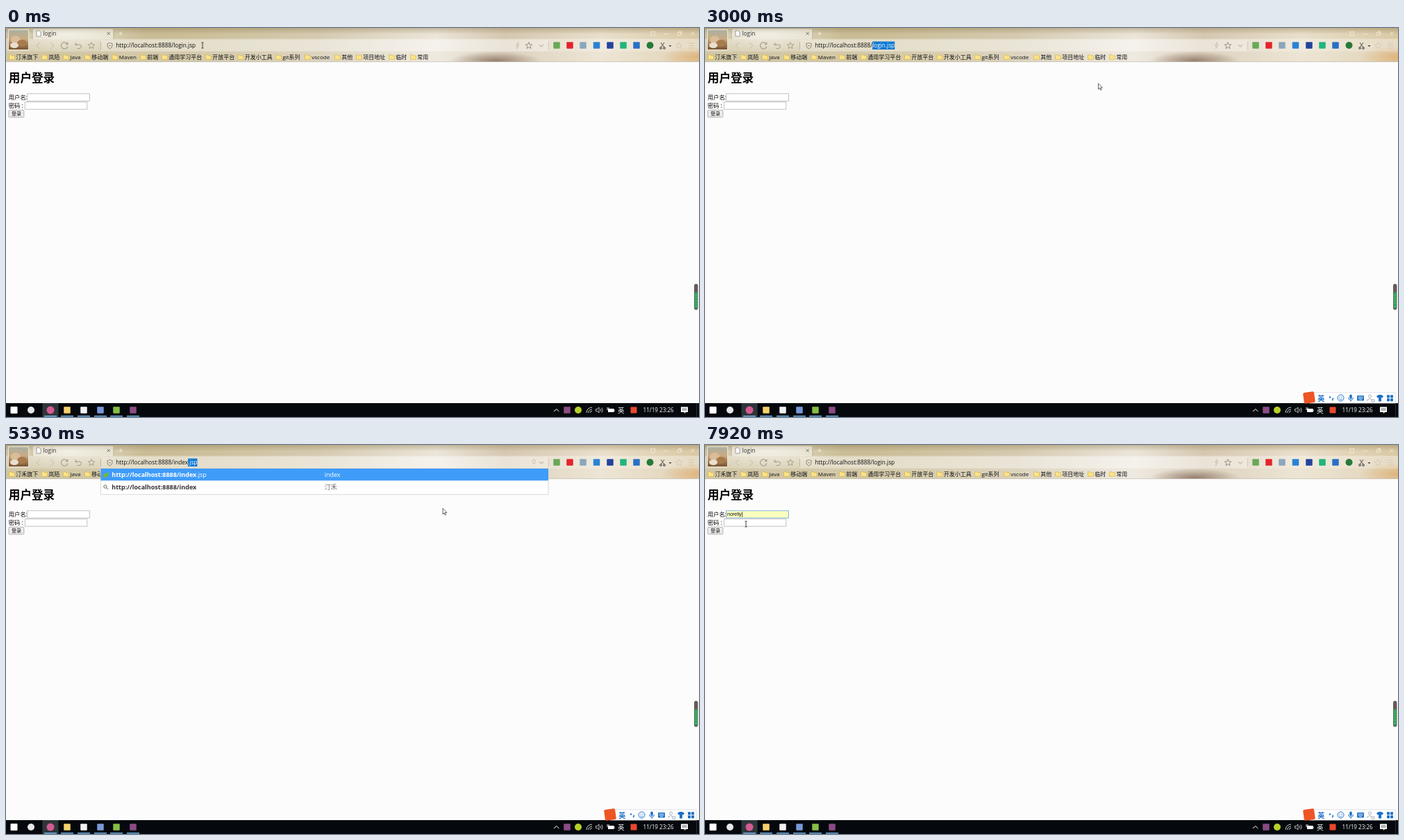
An HTML page that plays this animation: 998 px wide and 561 px high, repeating every 8000 ms.

```html
<!DOCTYPE html>
<html lang="zh-CN">
<head>
<meta charset="utf-8">
<title>login</title>
<style>
html, body { margin: 0; width: 100%; height: 100%; overflow: hidden; background: #fcfcfd; }
#skin {
  position: absolute; width: 998px; height: 49px;
  background:
    linear-gradient(#8b784866, #fff0 9px 15px, #ffffff59 16px 33px, #ffffff30 35px),
    radial-gradient(ellipse 65px 13px at 705px 47px, #72543fdd, #72543f00),
    radial-gradient(ellipse 55px 16px at 998px 42px, #d8994ccc, #d8994c00),
    radial-gradient(ellipse 110px 28px at 90px 8px, #fff9, #fff0),
    linear-gradient(90deg, #c6b990, #cabd96 25%, #d5cab0 45%, #ebe5d9 62%, #d5c7b0 72%, #e9dfcb 86%, #d9c8a4);
}
svg { position: absolute; left: 0; top: 0; white-space: pre; }
</style>
</head>
<body>
<div id="skin"></div>
<svg id="stage" width="998" height="561" font-family="'Open Sans','Noto Sans CJK SC','Noto Sans CJK',sans-serif"></svg>
<script>
const rect = (x, y, w, h, fill, more = '') =>
  `<rect x="${x}" y="${y}" width="${w}" height="${h}" fill="${fill}" ${more}/>`;
const circle = (x, y, r, fill, more = '') =>
  `<circle cx="${x}" cy="${y}" r="${r}" fill="${fill}" ${more}/>`;
const line = (d, color, width = 1, fill = 'none') =>
  `<path d="${d}" stroke="${color}" stroke-width="${width}" fill="${fill}"/>`;
const text = (x, y, str, size = 8.3, fill = '#111', more = '') =>
  `<text x="${x}" y="${y}" font-size="${size}" fill="${fill}" ${more}>${str}</text>`;
const group = (id, body) => `<g id="${id}">${body}</g>`;
const square = (x, y, s, fill) => rect(x - s / 2, y - s / 2, s, s, fill, 'rx="1"');
const star = (x, y, color) => {
  let d = '';
  for (let i = 0; i < 10; i++) {
    const r = i % 2 ? 2.2 : 5, a = i * Math.PI / 5;
    d += `${i ? 'L' : 'M'}${x + r * Math.sin(a)} ${y - r * Math.cos(a)}`;
  }
  return line(d + 'Z', color, .9);
};
const folder = x =>
  line(`M${x + .5} 38.7h3l1 1.2h4v5.3h-8z`, '#d9b440', .7, '#fbe48a');

function photo() {
  return `<defs><linearGradient id="fur" x2="0" y2="1"><stop stop-color="#aab0a4"/>
    <stop offset=".45" stop-color="#c9ab84"/><stop offset="1" stop-color="#76502f"/></linearGradient></defs>`
    + rect(3.5, 2.5, 29, 29, 'url(#fur)', 'stroke="#eee8da"')
    + '<ellipse cx="14" cy="17" rx="7" ry="6" fill="#d8bd98"/><ellipse cx="23" cy="22" rx="7" ry="5" fill="#a87b4c"/>'
    + '<ellipse cx="12" cy="25" rx="6" ry="4" fill="#eadfce"/>';
}

function browser() {
  const pale = '#cfc6b4', gray = '#a1998a';
  let s = line('M38 16V3q0-2 2-2H153q2 0 2 2V16', '#a99c80', .7, '#ffffff70')
    + text(53.5, 11, 'login', 8.3, '#333')
    + line('M145.7 6l4 4m0-4l-4 4', '#555', .8)
    + line('M165 5.5v5m-2.5-2.5h5', '#f3eddd')
    + line('M928 4.5l2 1.3h3l2-1.3M929 5v6h5.500v-6M948 8.500h6M967.500 6.500h4v4h-4zM969 6.500v-1.500h4v4h-1.500M986.500 5.500l5 5m0-5l-5 5', '#f1e8d4', .9)
    + line('M49 21l-5 4.500l5 4.500M64 21l5 4.500l-5 4.500', pale, 1.2)
    + line('M101 21l-1.500 3l3.500 1M100 24h5.500q3.500 0 3 3t-6 2.500', gray, 1)
    + star(123, 25.5, gray)
    + rect(136.5, 17, 644, 16.5, '#ffffff38') + rect(136, 20, .8, 11, '#b5aa94')
    + line('M146 22.500l3.500-1l3.500 1v3q0 3-3.500 4.500q-3.500-1.500-3.500-4.500zM148 25.500h3', '#77705f', .8)
    + line('M768 24l3 3l3-3', '#c8bda5', 1.3)
    + rect(781, 20, .7, 11, '#c9c0ae')
    + line('M943 21l5 7m0-7l-5 7', '#444', 1) + circle(943, 29, 1.4, 'none', 'stroke="#444"') + circle(948, 29, 1.4, 'none', 'stroke="#444"')
    + line('M954.500 25l2 2l2-2z', 'none', 0, '#333')
    + star(969, 25.5, '#d4c9b3') + line('M983 22h8m-8 3.500h8m-8 3.500h8', '#d4c9b3', 1.1);
  [[793, '#69a956'], [812, '#e5242c'], [831, '#89a7bd'], [850.5, '#2a82d4'],
   [870, '#24449c'], [889, '#22b57c'], [908, '#2870c4']].forEach(([x, c]) => s += square(x, 25, 9.5, c));
  s += circle(927.5, 25, 5, '#277a38');
  [[4, '汀禾旗下'], [51, '岚陌'], [82, 'Java'], [113, '移动端'], [152.5, 'Maven'], [193, '前端'],
   [224, '通用学习平台'], [287, '开放平台'], [333.5, '开发小工具'], [388, 'git系列'], [430, 'vscode'],
   [473, '其他'], [504, '项目地址'], [551, '临时'], [582, '常用']]
    .forEach(([x, name]) => s += folder(x) + text(x + 10.3, 45, name, 8));
  return s + rect(0, 48.5, 998, .6, '#bdb6a8') + photo();
}

function page() {
  const box = 'stroke="#b4b4b4" stroke-width=".8"';
  return text(3.8, 78.3, '用户登录', 16.6, '#000', 'font-weight="700"')
    + text(3.8, 102.5, '用户名:') + text(3.8, 114.6, '密码 :')
    + rect(30.5, 94.8, 90, 10.4, '#fff', box + ' id="user"')
    + rect(27.3, 106.8, 89.5, 10.4, '#fff', box)
    + rect(4, 118.4, 21.8, 10.4, '#ececec', 'stroke="#a3a3a3" stroke-width=".8" rx="1"')
    + text(8, 126.2, '登录', 7)
    + group('name', text(32, 102.4, 'norelly', 7, '#111', 'font-family="\'Liberation Sans\',sans-serif"') + rect(53, 96.5, .7, 7.5, '#111'))
    + rect(991, 369, 5.5, 37.5, '#655a58', 'rx="2.7"')
    + line('M991.700 381h4.200v22q-2 4-4.200 0z', 'none', 0, '#2fa35b')
    + line('M992 385h3.500m-3.500 4h3.500m-3.500 4h3.500m-3.500 4h3.500m-3.500 4h3.500', '#66cb87', .7);
}

function taskbar() {
  let s = rect(0, 541, 998, 20, '#05090d') + rect(52.5, 541, 23, 20, '#2f363b')
    + square(11.5, 551, 10, '#fff') + circle(36, 551, 5, '#e4e6e7') + circle(64, 551, 5.5, '#d25c91');
  [[88, '#f4d16c'], [112, '#f2f2f2'], [136, '#7898d8'], [159, '#85bd45'], [183, '#8b4a83'], [808, '#8b4a83']]
    .forEach(([x, c]) => s += square(x, 551, 9.5, c));
  [64, 88, 112, 136, 159, 183].forEach(x => s += rect(x - 9, 559, 18, 1.5, '#76b9ed'));
  return s + line('M789 553l3.700-3.500l3.700 3.500', '#fff', 1)
    + circle(824, 551, 5, '#b9cf27')
    + line('M836 555q0-7 8-8M838.500 555q0-4.500 5.500-5M841 555q0-2.500 3-2.500', '#ddd', .9)
    + line('M849.500 549.500h2l2.500-2.500v8l-2.500-2.500h-2z', '#fff', .7)
    + line('M856 549q1.500 2 0 4M858 547.500q2.500 3.500 0 7', '#fff', .7)
    + rect(867, 549, 8.5, 5, '#fff') + rect(875.5, 550.3, 1, 2.5, '#fff') + line('M866 547v4m2-4v3', '#fff', .9)
    + text(881, 554.5, '英', 9.5, '#fff') + square(904, 551, 9, '#e9482d')
    + text(917.5, 554.2, '11/19 23:26', 8.1, '#fff')
    + line('M972 546.500h10v7.500h-3l-2 2v-2h-5z', 'none', 0, '#fff')
    + line('M973.500 549h7m-7 2h7', '#222', .7) + rect(994.5, 541, .5, 20, '#555');
}

function inputBar() {
  const blue = '#1d70c5';
  return rect(870, 525.8, 124, 15.2, '#fff', 'stroke="#d9dde2" stroke-width=".8"')
    + `<g transform="rotate(-8 870 533)">${rect(862, 525, 16, 16, '#ee5524', 'rx="2"')}</g>`
    + text(882.3, 537.5, '英', 10, blue, 'font-weight="700"')
    + circle(900, 532.5, 1.2, blue) + line('M904 533.500q1 2-1 3.500', blue, 1.4)
    + circle(915.5, 533.5, 4.5, 'none', `stroke="${blue}"`) + circle(914, 532.3, .7, blue) + circle(917, 532.3, .7, blue)
    + line('M913 534.700q2.500 2.500 5 0', blue, .8)
    + rect(928.3, 528.5, 3.4, 6.5, blue, 'rx="1.700"') + line('M926.500 533q0 3.500 3.500 3.500t3.500-3.500M930 536.500v2.500', blue)
    + rect(939, 530, 10, 7.5, blue, 'rx="1"') + line('M940.500 532h7m-7 2h7m-5.500 2h4', '#fff', .8)
    + circle(957.5, 531, 2, 'none', 'stroke="#a7b0ba"') + line('M954 538v-2q3.500-3 6 0M960 536h4v3h-4z', '#a7b0ba')
    + line('M967 531l3-2h4l3 2l-1.500 2.500l-1.500-.5v5.500h-4v-5.500l-1.500.5z', 'none', 0, blue)
    + [982, 987].map(x => [529.3, 534.3].map(y => rect(x, y, 4, 4, blue)).join('')).join('');
}

const row = (y, color, icon) => icon
  + `<text x="152.300" y="${y}" font-size="9" fill="${color}"><tspan font-weight="700"></tspan><tspan></tspan></text>`;
function suggestions() {
  return rect(136.5, 34, 644.5, 37.3, '#fff', 'stroke="#d2d0c8" stroke-width=".8"')
    + rect(136.5, 34, 644.5, 17.3, '#3f9cf9')
    + row(45.8, '#fff', line('M140 46q0-6 8-6q0 7-7 7z', 'none', 0, '#77b82e'))
    + text(458.7, 45.8, 'index', 9, '#fff')
    + row(63.6, '#333', circle(143, 60, 2.2, 'none', 'stroke="#666"') + line('M144.700 61.700l2.500 2.500', '#666'))
    + text(458.7, 63.6, '汀禾', 9, '#666');
}

const reload = line('M88.300 23a4.700 4.700 0 1 0 .5 3.500M88.800 20.500v3h-3', '#a1998a', 1.1);
const $ = id => document.getElementById(id);
$('stage').innerHTML = browser()
  + group('idle', line('M44 4h4l2 2v6h-6z', '#777', .7, '#fff') + reload)
  + group('busy', line('M80 21.500l8 8m0-8l-8 8', '#8e8678', 1.2)
    + group('spin', line('M47 4.500a3.500 3.500 0 0 1 3.500 3.500', '#666', .9))
    + rect(0, 528, 332, 13, '#f4f4ef') + text(2, 538, '正在解析主机...', 8.3, '#929292'))
  + group('tools', line('M737.500 20.500l-3 5h2l-1 4.500l3.500-6h-2z', '#c4b9a3', .8) + star(753, 25.5, '#8e8678'))
  + group('mini', line('M759 28l1-2M758 24q0-3 2.500-3t2 3t-3 2.500z', '#c4b9a3', .8))
  + rect(0, 19.5, 0, 11.5, '#0b78d4', 'id="mark"')
  + '<text id="url" x="158.300" y="28" font-size="8.260" fill="#111"><tspan></tspan><tspan fill="#fff"></tspan></text>'
  + page() + taskbar() + group('ime', inputBar()) + group('list', suggestions())
  + group('beam', line('M-1.500-4h3m-1.500 0v8m-1.500 0h3', '#333', .9))
  + group('arrow', line('M0-4.700v8.500l2-1.800l1.400 3l1.200-.6l-1.400-2.900h2.700z', '#222', .7, '#fff'));

const show = (id, on) => $(id).setAttribute('display', on ? 'inline' : 'none');
const host = 'http://localhost:8888/';
const keyTimes = [3400, 4160, 4410, 4660, 4990];
const enter = 5410, loaded = 6160, focus = 7160, filled = 7740;
// time, x, y of the mouse
const path = [[0, 283, 25], [1660, 283, 25], [1750, 273, 25], [2030, 241, 25], [2500, 241, 25],
  [3170, 631, 96], [6160, 631, 96], [6900, 74, 110], [7330, 74, 110], [7660, 59, 114], [8000, 59, 114]];

function mouse(t) {
  const i = path.findIndex(p => p[0] > t), [t0, x0, y0] = path[i - 1], [t1, x1, y1] = path[i];
  const u = (t - t0) / (t1 - t0), e = u * u * (3 - 2 * u);
  return [x0 + (x1 - x0) * e, y0 + (y1 - y0) * e];
}

function split(el, a, b) {
  el.children[0].textContent = a;
  el.children[1].textContent = b;
}

function drawAddress(t, typed) {
  const url = host + (typed ? 'index.jsp' : 'login.jsp');
  let cut = url.length;
  if (typed) cut = host.length + typed;
  else if (t >= 1750 && t < enter) cut -= Math.min(9, Math.round((t - 1750) / 31));
  split($('url'), url.slice(0, cut), url.slice(cut));
  const [head, tail] = $('url').children;
  $('mark').setAttribute('x', 158.3 + head.getComputedTextLength());
  $('mark').setAttribute('width', cut < url.length ? tail.getComputedTextLength() : 0);
  if (typed) {
    const [first, second] = [...$('list').querySelectorAll('text')].filter(el => el.children.length);
    split(first, url.slice(0, cut), url.slice(cut));
    split(second, url.slice(0, cut), '');
  }
}

function draw(now) {
  const t = Math.floor((now % 8000 + 5) * .012) / .012 % 8000;
  const typed = t < enter ? keyTimes.filter(k => t >= k).length : 0;
  const busy = t >= enter && t < loaded;
  drawAddress(t, typed);
  show('list', typed);
  show('mini', typed);
  show('tools', !typed);
  show('busy', busy);
  show('idle', !busy);
  show('ime', t >= 1750 && t < enter || t >= focus);
  show('name', t >= filled);
  $('spin').setAttribute('transform', `rotate(${(t - 5500) * .36} 47 8)`);
  $('user').setAttribute('fill', t >= filled ? '#faffbd' : '#fff');
  $('user').setAttribute('stroke', t >= focus ? '#69a0e8' : '#b4b4b4');
  const [x, y] = mouse(t);
  const overText = y < 34 || x > 27 && x < 121 && y > 94 && y < 118;
  show('beam', overText);
  show('arrow', !overText);
  for (const id of ['beam', 'arrow']) $(id).setAttribute('transform', `translate(${x - (overText ? 0 : 2)} ${y})`);
  requestAnimationFrame(draw);
}
requestAnimationFrame(draw);
</script>
</body>
</html>
```
